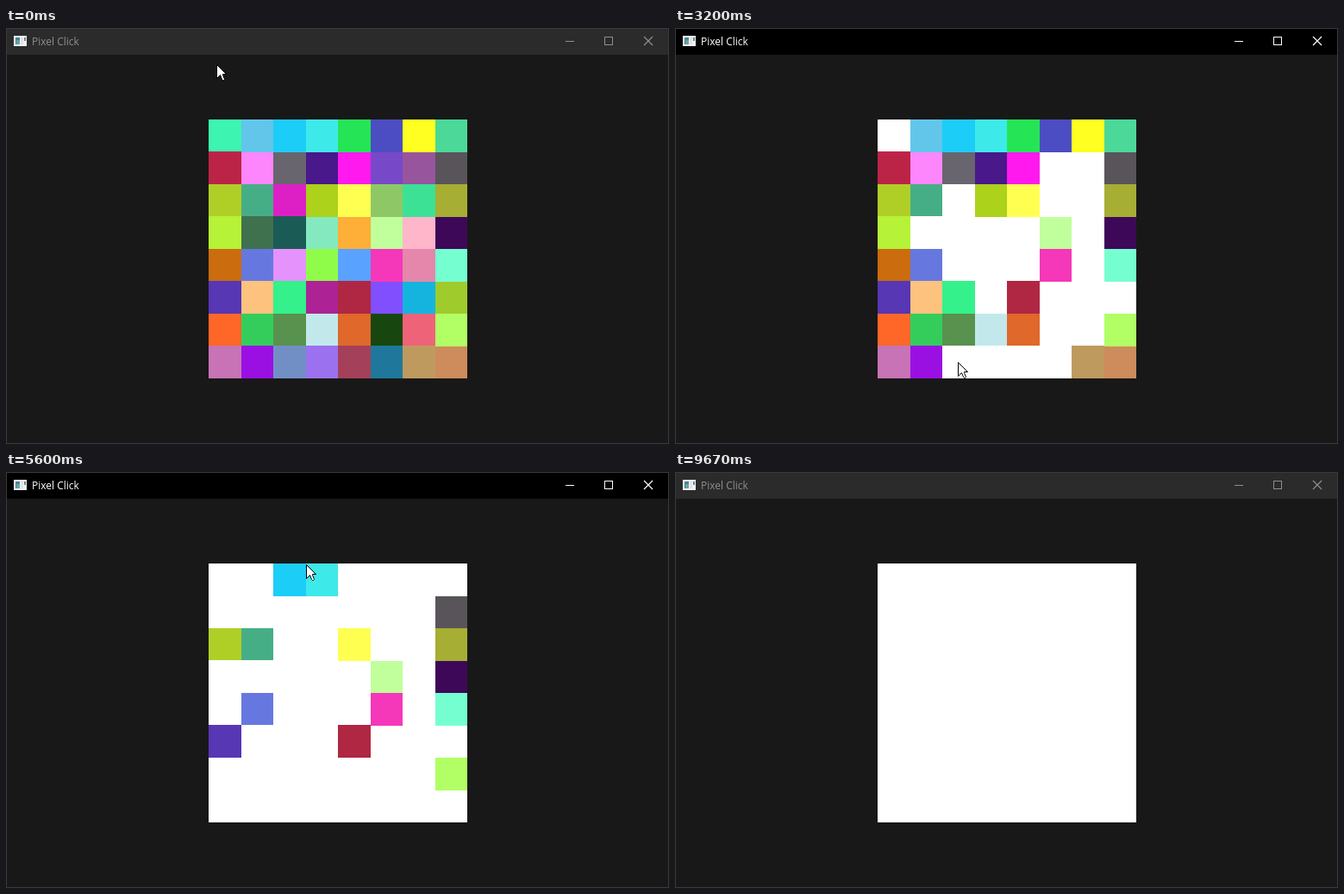
Write an HTML page with a canvas that moves like this. It is 769 px wide and 482 px high and loops after 10000 ms.

```html
<!DOCTYPE html>
<html lang="en">
<head>
<meta charset="utf-8">
<title>Pixel Click</title>
<style>
  html, body { margin: 0; width: 100%; height: 100%; overflow: hidden; background: #181818; }
  canvas { display: block; }
</style>
</head>
<body>
<canvas id="stage" width="769" height="482"></canvas>
<script>
const ctx = document.getElementById('stage').getContext('2d');
const LOOP = 10000, FPS = 15;
const LEFT = 235, TOP = 106, CELL = 37.5;
const ACTIVATE = 8, POINTER_GONE = 139, DEACTIVATE = 145;

const colors = [
  '3df5b0 62c6ea 1ccdf7 3ee9e9 25e556 4c4dc2 ffff22 4cd898',
  'bc2447 fd86fd 68656f 49188a ff19ee 7749c8 97559e 59545a',
  'afcf27 46ae87 dd20c6 acd21b ffff52 8ec866 3ce196 a6ae33',
  'b6f237 40714f 1b5b56 85e9c0 fdaf38 c0ff9b ffb6ca 3e0858',
  'cb6c0f 6678df e692fd 90fc4a 5aa2ff f537b9 e587aa 75ffd0',
  '5737b3 fcc27e 34f18b ad2395 af2743 824fff 15b4df a0cb2c',
  'ff6728 34cd5b 58924e c2e8ec df682a 17470f ee6378 b1ff65',
  'c873b5 9a10e3 728fc5 9c71f0 a5405a 1f789b bf9a5f ce8b5c'
].map(row => row.split(' '));

const stops = new Map();
const paintedAt = {};
const lerp = (a, b, u) => a + (b - a) * u;

function move(tick, x, y) {
  stops.set(tick, [x, y]);
}

// Drags through corner cells (row and column digits), painting each cell passed.
function paint(start, end, corners) {
  const [first, ...rest] = corners.split(' ').map(id => [+id[0], +id[1]]);
  const cells = [first];
  for (const [row, col] of rest) {
    const [r, c] = cells.at(-1);
    const steps = Math.max(Math.abs(row - r), Math.abs(col - c));
    for (let i = 1; i <= steps; i++) {
      cells.push([lerp(r, row, i / steps), lerp(c, col, i / steps)]);
    }
  }
  cells.forEach(([r, c], i) => {
    const tick = start + (end - start) * i / Math.max(1, cells.length - 1);
    paintedAt[[r, c]] ??= tick;
    move(tick, LEFT + (c + 0.5) * CELL, TOP + (r + 0.5) * CELL);
  });
}

move(0, 245, 42);
paint(ACTIVATE, ACTIVATE, '00');
move(16, 264, 214);
move(18, 274, 225);
paint(20, 32, '31 32 22 42 53 33 34 44');
paint(34, 42, '56 66 57 46 16 15 25');
move(37, 493, 275);
paint(43, 52, '55 75 70 60 61');
paint(54, 58, '76 77 76 65 63 64');
paint(58, 62, '64 62 52 51 40 30');
move(58, 405, 352);
paint(63, 67, '23 13 10');
move(70, 217, 150);
paint(71, 78, '01 12 14 04 07');
move(79, 574, 124);
move(80, 488, 140);
move(84, 349, 107);
paint(86, 88, '03 02');
move(96, 277, 127);
paint(101, 106, '17 67');
paint(108, 111, '54 45 35 24');
move(119, 326, 288);
paint(121, 125, '41 21 20');
paint(128, 128, '50');
move(128, 258, 329);
move(129, 259, 334);
move(134, 259, 334);
move(136, 271, 385);
move(138, 185, 456);

const path = [...stops].sort((a, b) => a[0] - b[0]);

function pointerAt(tick) {
  const next = path.findIndex(stop => stop[0] >= tick);
  if (next < 1) return path[0][1];
  const [t0, a] = path[next - 1], [t1, b] = path[next];
  return a.map((v, i) => Math.round(lerp(v, b[i], (tick - t0) / (t1 - t0))));
}

// Ticks begin on multiples of 10 ms.
function tickAt(ms) {
  const tick = Math.round(ms * FPS / 1000);
  return Math.round(tick * 100 / FPS) * 10 > ms ? tick - 1 : tick;
}

function rect(color, x, y, w, h) {
  ctx.fillStyle = color;
  ctx.fillRect(x, y, w, h);
}

function drawWindow(active) {
  const ink = active ? '#fff' : '#8e8e8e';
  rect('#181818', 0, 0, 769, 482);
  rect(active ? '#000' : '#2b2b2b', 0, 0, 769, 31);
  ctx.lineWidth = 1;
  ctx.strokeStyle = '#3a3a3a';
  ctx.strokeRect(0.5, 0.5, 768, 481);

  rect('#f2f2f2', 9, 9, 15, 12);
  rect('#4d7f9e', 11, 11, 5, 8);
  rect('#65a596', 12, 14, 4, 5);
  rect('#dfe4e9', 17, 11, 3, 8);
  rect('#76858c', 21, 11, 2, 4);

  ctx.fillStyle = ink;
  ctx.font = '12px "Open Sans", "Noto Sans", sans-serif';
  ctx.fillText('Pixel Click', 30, 20);

  rect(ink, 649, 15, 10, 1);
  ctx.strokeStyle = ink;
  ctx.strokeRect(694.5, 10.5, 9, 9);
  ctx.lineWidth = 1.2;
  ctx.stroke(cross);
}
const cross = new Path2D('M740 10L750 20M750 10L740 20');

// Each square is split along its diagonal, so half-pixel edges round by side.
function rowEdge(row, col) {
  const y = TOP + row * CELL;
  return col < row ? Math.floor(y) : Math.ceil(y);
}

function drawGrid(tick) {
  colors.forEach((row, r) => row.forEach((hex, c) => {
    const x = Math.round(LEFT + c * CELL), y = rowEdge(r, c);
    const right = Math.round(LEFT + (c + 1) * CELL);
    const color = tick >= paintedAt[[r, c]] ? '#fff' : '#' + hex;
    rect(color, x, y, right - x, rowEdge(r + 1, c) - y);
  }));
}

const arrow = new Path2D('M0 0V16L4 12L6 17L7 18H8L9 17L7 12V11H11Z');
function drawPointer([x, y]) {
  ctx.save();
  ctx.translate(x - 0.5, y + 0.5);
  ctx.lineWidth = 1;
  ctx.fillStyle = '#fff';
  ctx.strokeStyle = '#000';
  ctx.fill(arrow);
  ctx.stroke(arrow);
  ctx.restore();
}

function draw(ms) {
  const tick = tickAt(ms % LOOP);
  drawWindow(tick >= ACTIVATE && tick < DEACTIVATE);
  drawGrid(tick);
  if (tick < POINTER_GONE) drawPointer(pointerAt(tick));
}

const begin = performance.now();
function loop() {
  draw(performance.now() - begin);
  requestAnimationFrame(loop);
}
loop();
</script>
</body>
</html>
```
